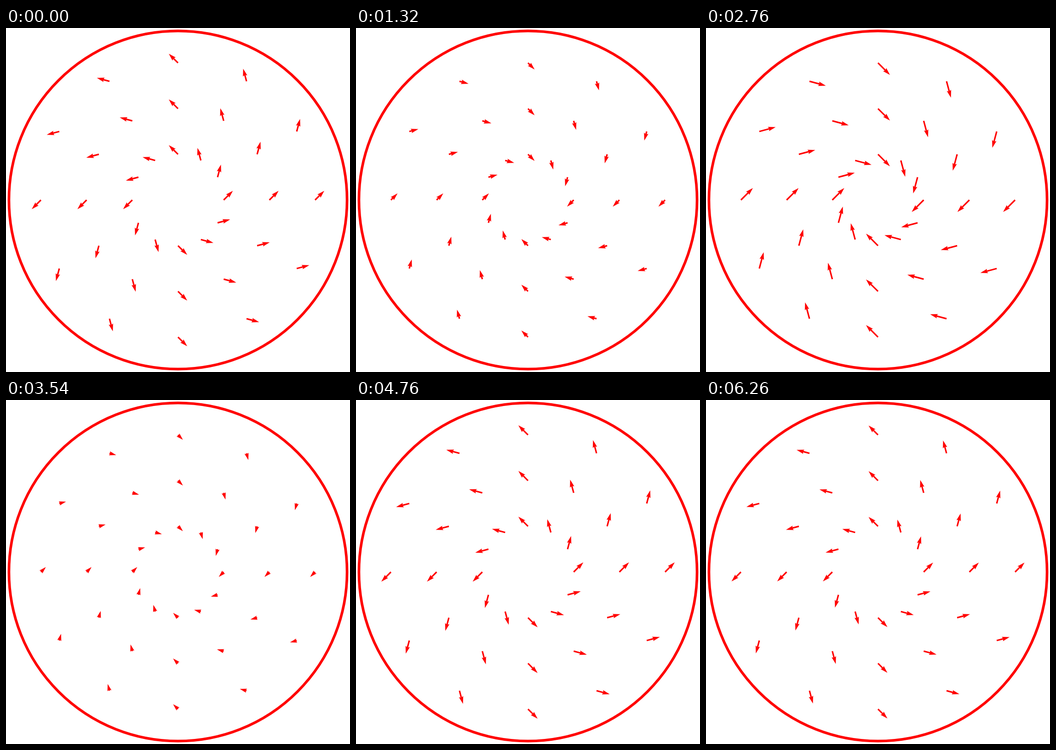
An HTML page with a canvas that plays this animation: 748x748 px, repeating every 6.28 s.

```html
<!DOCTYPE html>
<html lang="en">
<head>
<meta charset="utf-8">
<title>Oscillating vector field</title>
<style>
  html, body { margin: 0; width: 100%; height: 100%; overflow: hidden; background: #fff; }
  canvas { display: block; width: 748px; height: 748px; }
</style>
</head>
<body>
<canvas id="stage" width="748" height="748"></canvas>
<script>
const ctx = document.getElementById("stage").getContext("2d");
const LOOP = 6280, STEP = 20;
const CENTER = 374, UNIT = 99.35;
const REACH = 40;      // arrow length at full swing
const SHAFT = 3.25;    // shaft width; the head scales with it
const HEAD = 5 * SHAFT;

// Arrow along +x from the origin; short ones shrink as a whole.
function arrowPath(length) {
  const w = SHAFT * Math.min(1, length / HEAD);
  const base = length - 5 * w, notch = length - 4.5 * w;
  ctx.moveTo(0, -w / 2);
  ctx.lineTo(notch, -w / 2);
  ctx.lineTo(base, -1.5 * w);
  ctx.lineTo(length, 0);
  ctx.lineTo(base, 1.5 * w);
  ctx.lineTo(notch, w / 2);
  ctx.lineTo(0, w / 2);
}

function hexagonPath(radius) {
  for (let i = 0; i < 6; i++) {
    const a = i * Math.PI / 3;
    ctx.lineTo(radius * Math.cos(a), radius * Math.sin(a));
  }
}

function drawVector(x, y, angle, value) {
  const length = Math.abs(value);
  ctx.save();
  ctx.translate(x, y);
  ctx.beginPath();
  if (length < SHAFT) {
    hexagonPath(SHAFT / 2);
  } else {
    ctx.rotate(value < 0 ? angle + Math.PI : angle);
    arrowPath(length);
  }
  ctx.closePath();
  ctx.fill();
  ctx.restore();
}

function draw(ms) {
  const t = Math.floor((ms % LOOP) / STEP) * STEP / 1000;
  const value = REACH * Math.cos(t + Math.PI / 4);

  ctx.fillStyle = "#fff";
  ctx.fillRect(0, 0, 748, 748);
  ctx.fillStyle = ctx.strokeStyle = "#f00";

  ctx.lineWidth = 5.7;
  ctx.beginPath();
  ctx.arc(CENTER, CENTER, 3.7 * UNIT, 0, 2 * Math.PI);
  ctx.stroke();

  for (let ring = 1; ring <= 3; ring++) {
    for (let i = 0; i < 12; i++) {
      const a = i * Math.PI / 6, r = ring * UNIT;
      drawVector(CENTER + r * Math.cos(a), CENTER + r * Math.sin(a), a - Math.PI / 4, value);
    }
  }
}

let start;
function tick(now) {
  if (start === undefined) start = now;
  draw(now - start);
  requestAnimationFrame(tick);
}
draw(0);
requestAnimationFrame(tick);
</script>
</body>
</html>
```
